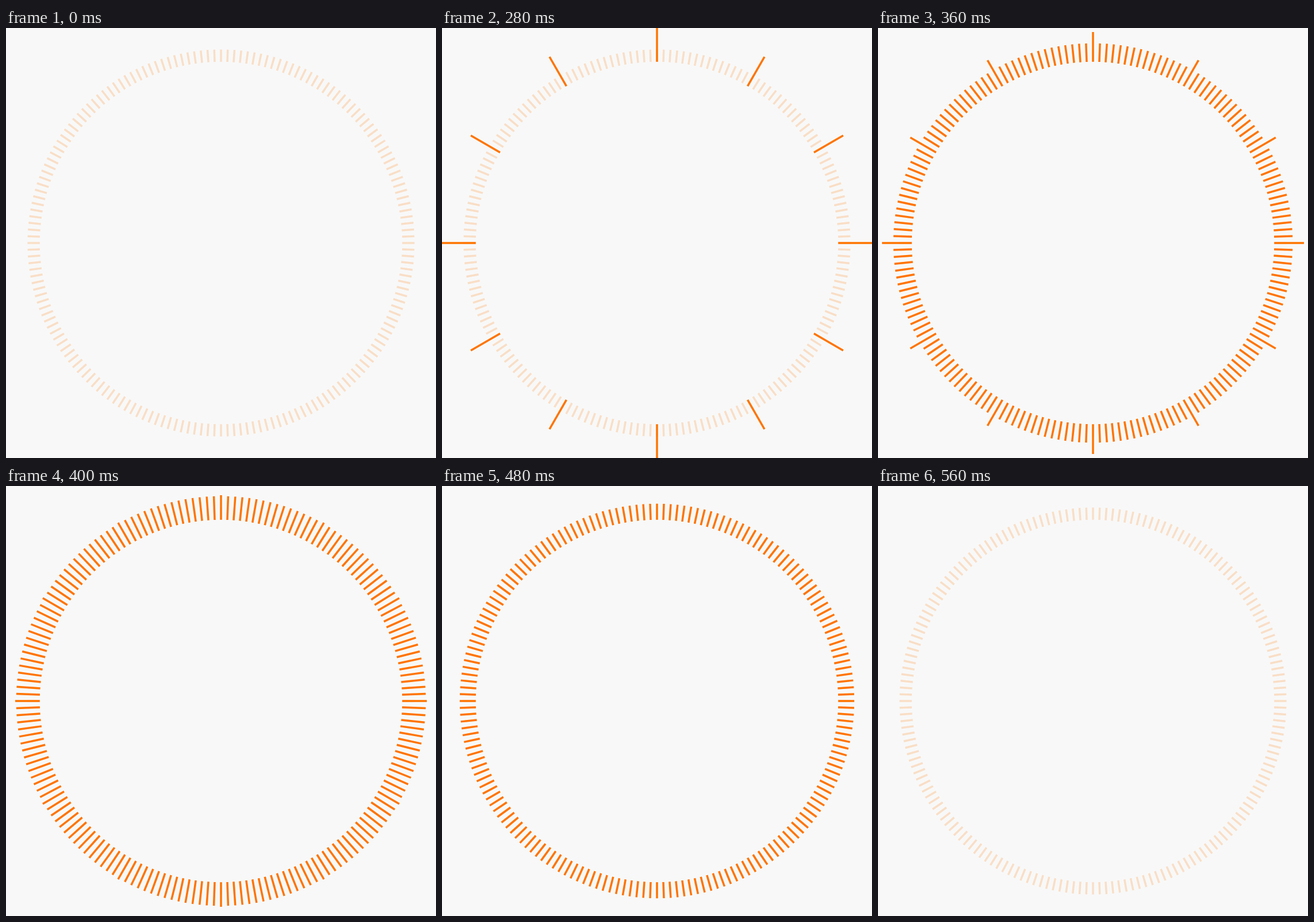
An HTML page that plays this animation: 748x748 px, repeating every 600 ms.

```html
<!DOCTYPE html>
<html lang="en">
<head>
<meta charset="utf-8">
<title>Radial ticks</title>
<style>
  html, body { margin: 0; width: 100%; height: 100%; overflow: hidden; background: #f8f8f8; }
  svg { display: block; width: 100vw; height: 100vh; }
  path { fill: none; stroke-width: 3.5; }
</style>
</head>
<body>
<svg viewBox="-374 -374 748 748">
  <path id="base" stroke="#f9dec6"/>
  <path id="minor" stroke="#ff7400"/>
  <path id="major" stroke="#ff7400"/>
</svg>
<script>
const LOOP = 600, STEP = 40, STAGE = 120;
const COUNT = 180, MAJOR_EVERY = 15;
const INNER = 315.2, LIMIT = 374;
const BASE = 21.4, TALL = 42, PEAK = 84;

const clamp = x => Math.min(1, Math.max(0, x));
const easeOut = x => 1 - Math.pow(1 - x, 3.5);
const progress = (t, start) => clamp((t - start) / STAGE);
const isMajor = i => i % MAJOR_EVERY === 0;

function ticks(length, keep) {
  if (length <= 0) return "";
  const outer = Math.min(INNER + length, LIMIT);
  let d = "";
  for (let i = 0; i < COUNT; i++) {
    if (!keep(i)) continue;
    const a = i / COUNT * 2 * Math.PI;
    const x = Math.sin(a), y = -Math.cos(a);
    const point = r => (x * r).toFixed(2) + " " + (y * r).toFixed(2);
    d += "M" + point(INNER) + "L" + point(outer);
  }
  return d;
}

function setPath(id, length, keep) {
  document.getElementById(id).setAttribute("d", ticks(length, keep));
}

function draw(time) {
  const t = Math.floor((time % LOOP) / STEP) * STEP;
  const rise = easeOut(progress(t, 198));
  const settle = easeOut(progress(t, 319.2));
  const left = 1 - progress(t, 440);
  setPath("minor", TALL * settle * left, i => !isMajor(i));
  setPath("major", (PEAK * rise - (PEAK - TALL) * settle) * left, isMajor);
}

setPath("base", BASE, () => true);
const begin = performance.now();
function tick() {
  draw(performance.now() - begin);
  requestAnimationFrame(tick);
}
tick();
</script>
</body>
</html>
```
